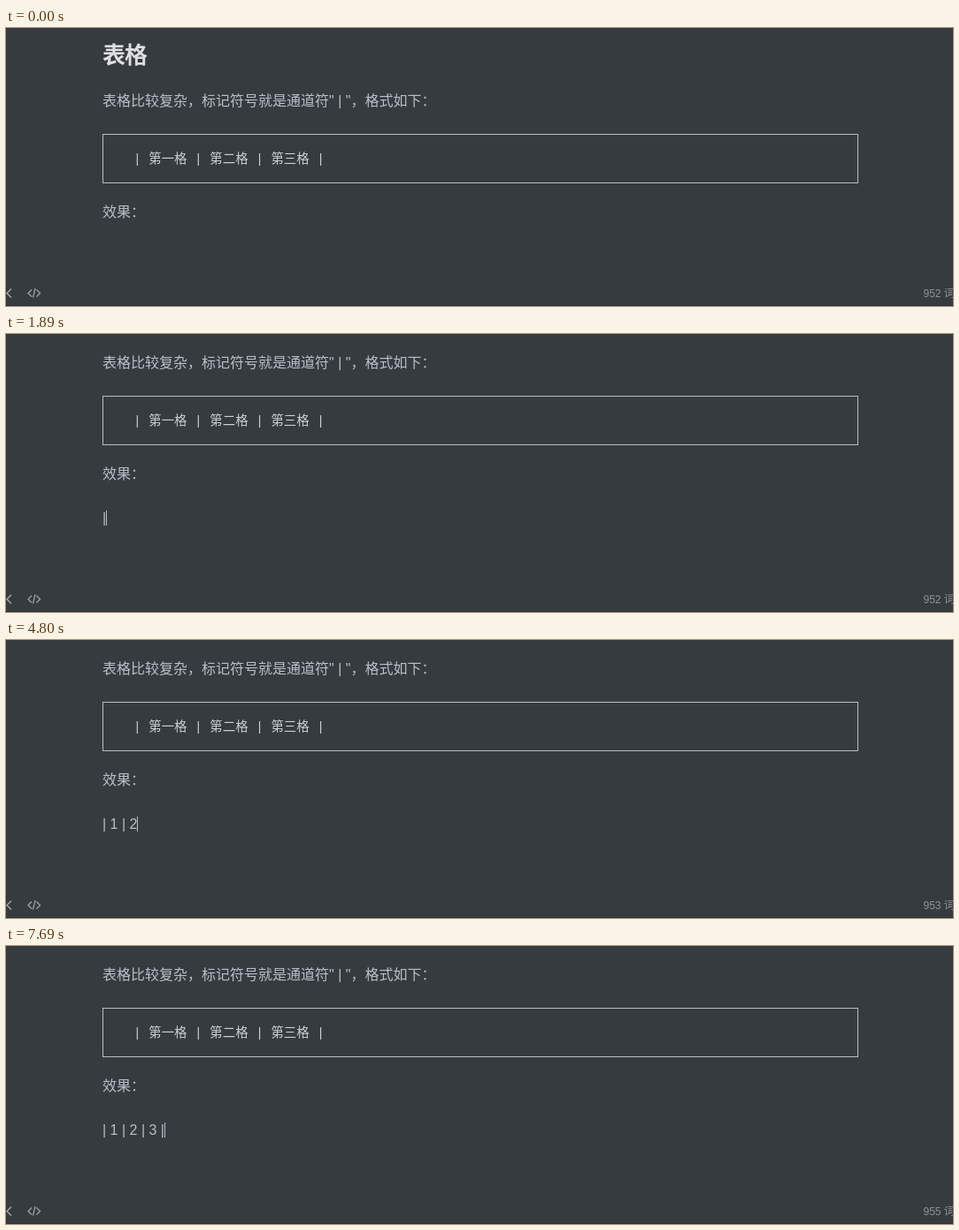
An HTML page for the animation above (8000 ms loop, 1070 by 315 pixels).

```html
<!DOCTYPE html>
<html lang="zh-CN">
<head>
<meta charset="utf-8">
<style>
  html, body { margin: 0; width: 100%; height: 100%; overflow: hidden; background: #363b40; }
  #stage { position: relative; width: 1070px; height: 315px; overflow: hidden; background: #363b40;
    color: #b8bfc6; font: 16px/17px "Liberation Sans", "Noto Sans CJK SC", "Noto Sans CJK", sans-serif; }
  #stage div { position: absolute; white-space: pre; }
  #page { left: 0; top: 0; width: 1070px; height: 290px; }
  .line { left: 109px; }
  #page .title { top: 16px; font-size: 26px; line-height: 30px; font-weight: bold;
    letter-spacing: -1px; color: #dedede; }
  .code { left: 109px; top: 120px; width: 852px; height: 54px; border: 1px solid #b8bfc6; }
  .code div { left: 34px; top: 20px; color: #cdd1d5;
    font: 14.4px/16px "Liberation Mono", "Noto Sans CJK SC", "Noto Sans CJK", monospace; }
  #label, #typed { top: 200px; }
  #caret { width: 1px; height: 17px; background: #b8bfc6; }
  #count { left: 1036.5px; top: 294px; font-size: 12px; line-height: 14px; color: #8e9397; }
  .edge { left: 0; top: 314px; width: 1070px; height: 1px; background: #2d3135; }
  svg { position: absolute; left: 0; top: 290px; fill: none; stroke: #a2a7ab; stroke-width: 1.2; }
</style>
</head>
<body>
<div id="stage">
  <div id="page">
    <div class="line title">表格</div>
    <div class="line" style="top:74px">表格比较复杂，标记符号就是通道符" | "，格式如下：</div>
    <div class="code"><div>| 第一格 | 第二格 | 第三格 |</div></div>
    <div class="line" id="label">效果：</div>
  </div>
  <div class="line" id="typed"></div>
  <div id="caret"></div>
  <svg width="50" height="22">
    <path d="M6 5.5 1 10.5 6 15.5" stroke-width="1.5"/>
    <path d="M29 6.5 25 10.5 29 14.5M34.5 6.5 38.5 10.5 34.5 14.5M33 5 30.5 15.5"/>
  </svg>
  <div id="count"></div>
  <div class="edge"></div>
</div>
<script>
const LOOP = 8000, FOCUS = 60, ENTER = 600;
const BLINK_ON = 560, BLINK_OFF = 500, COUNT_LAG = 100;
const TEXT = "| 1 | 2 | 3 |";

// Each cell starts with a pipe; its other three keys fall at fixed shares of the cell's time.
const pipes = [1890, 3820, 5620, 7690], shares = [0, 0.34, 0.5, 0.67];
const keys = pipes.flatMap((at, i) => shares.map(s => at + s * ((pipes[i + 1] ?? LOOP + at) - at)));

const [page, label, typed, caret, count] =
  ["page", "label", "typed", "caret", "count"].map(id => document.getElementById(id));

const textAt = t => TEXT.slice(0, keys.filter(k => k <= t).length);

function draw(t) {
  const scrolled = t >= ENTER, text = textAt(t);
  page.style.top = scrolled ? "-50px" : "0";
  typed.textContent = text;

  const idle = t - [FOCUS, ENTER, ...keys].filter((k, i) => !i || k <= t).pop();
  const line = scrolled ? typed : label;
  caret.style.left = Math.floor(line.getBoundingClientRect().right) + "px";
  caret.style.top = (scrolled && !text ? 201 : 200) + "px";
  caret.style.visibility = idle >= 0 && idle % (BLINK_ON + BLINK_OFF) < BLINK_ON ? "visible" : "hidden";

  count.textContent = 952 + textAt(t - COUNT_LAG).replace(/\D/g, "").length + " 词";
}

const start = performance.now();
function tick() {
  draw((performance.now() - start) % LOOP);
  requestAnimationFrame(tick);
}
draw(0);
requestAnimationFrame(tick);
</script>
</body>
</html>
```
